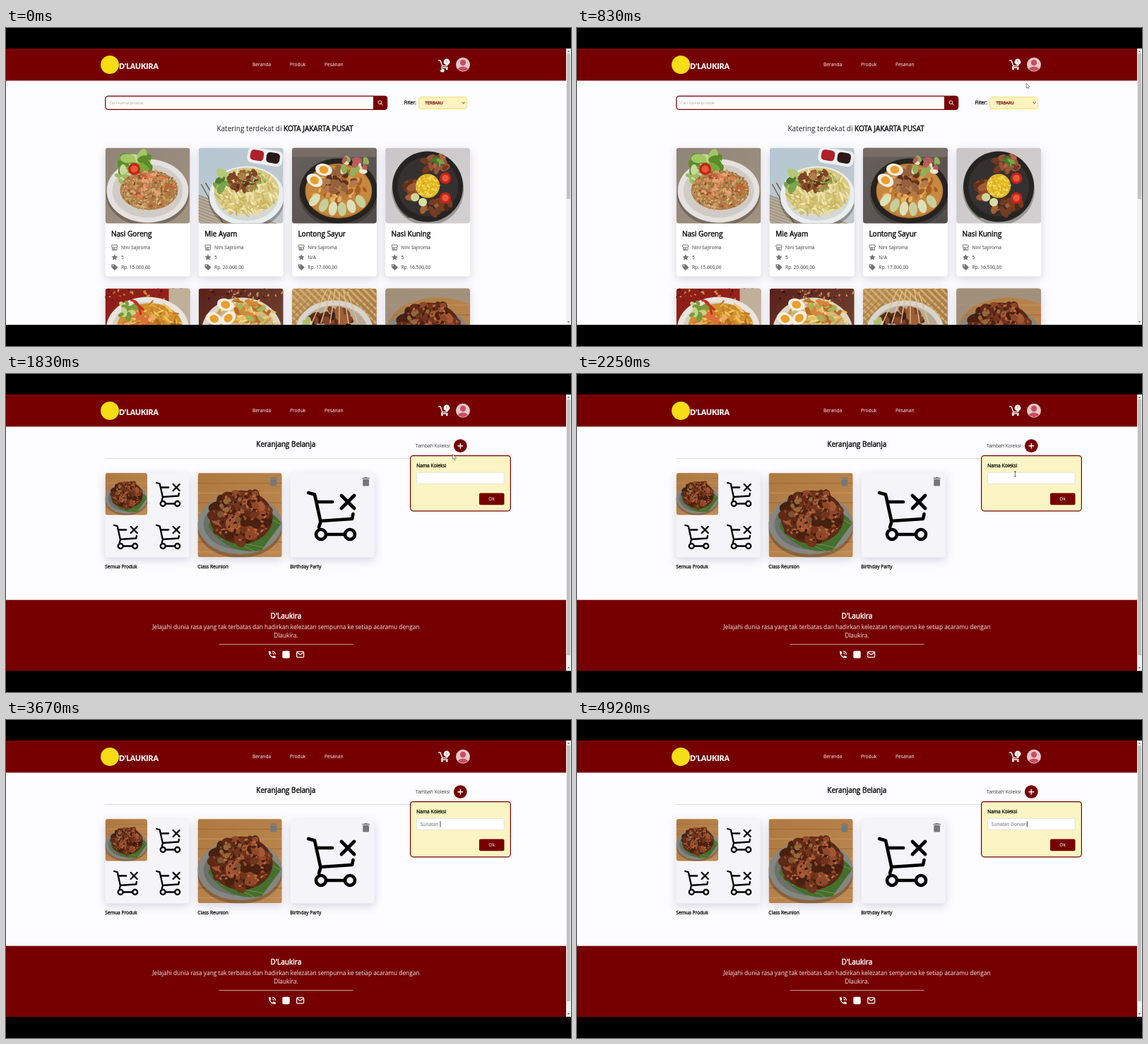
Animation of 800x450 px, one loop 5010 ms. Source, as an HTML page with a canvas:

```html
<!DOCTYPE html>
<html lang="id">
<head>
<meta charset="utf-8">
<title>Katering</title>
<style>
  html, body { margin: 0; width: 100%; height: 100%; overflow: hidden; background: #000; }
  canvas { display: block; width: 800px; height: 450px; }
</style>
</head>
<body>
<canvas id="stage" width="800" height="450"></canvas>
<script>
const LOOP = 5010, STEP = 1000 / 12;
const MAROON = '#760001', PAPER = '#fdfcfe', CREAM = '#fbf4c3', GREY = '#737376';
const BRAND = "D'Laukira", SELLER = 'Nini Sajiroma', ENTRY = 'Sunatan Dorvan';
const screen = document.getElementById('stage').getContext('2d');
let c = screen;

// ---- Basic shapes ----
function rect(x, y, w, h, color) { c.fillStyle = color; c.fillRect(x, y, w, h); }

function box(x, y, w, h, r, fill, border, width = 1) {
  c.beginPath();
  c.roundRect(x, y, w, h, r);
  if (fill) { c.fillStyle = fill; c.fill(); }
  if (border) { c.strokeStyle = border; c.lineWidth = width; c.stroke(); }
}

function oval(x, y, rx, ry, color, turn = 0) {
  c.beginPath();
  c.ellipse(x, y, rx, ry, turn, 0, Math.PI * 2);
  c.fillStyle = color;
  c.fill();
}

const disc = (x, y, r, color) => oval(x, y, r, r, color);

function shape(d, fill, stroke, width = 1) {
  const p = new Path2D(d);
  if (fill) { c.fillStyle = fill; c.fill(p); }
  if (stroke) {
    c.strokeStyle = stroke; c.lineWidth = width;
    c.lineCap = c.lineJoin = 'round';
    c.stroke(p);
  }
}

function at(x, y, scale, draw) {
  c.save();
  c.translate(x, y);
  c.scale(scale, scale);
  draw();
  c.restore();
}

function shadow(draw) {
  c.save();
  c.shadowColor = 'rgba(90,90,140,.24)';
  c.shadowBlur = 13;
  c.shadowOffsetY = 4;
  draw();
  c.restore();
}

function text(str, x, y, size, color, { bold, align = 'left' } = {}) {
  c.font = `${size}px "Open Sans", sans-serif`;
  c.textAlign = align;
  c.textBaseline = 'alphabetic';
  c.fillStyle = c.strokeStyle = color;
  c.fillText(str, x, y);
  if (bold) { c.lineWidth = size * .045; c.lineJoin = 'round'; c.strokeText(str, x, y); }
  return c.measureText(str).width;
}

// ---- Food pictures, drawn in a 120-unit wide space ----
function random(seed) {
  return () => (seed = (seed * 16807) % 2147483647) / 2147483647;
}

function scatter(seed, n, x, y, rx, ry, size, colors, slim = .6) {
  const rnd = random(seed * 7919);
  for (let i = 0; i < n; i++) {
    const a = rnd() * Math.PI * 2, d = Math.sqrt(rnd()), s = size * (.6 + rnd() * .7);
    oval(x + Math.cos(a) * rx * d, y + Math.sin(a) * ry * d, s, s * slim,
      colors[Math.floor(rnd() * colors.length)], rnd() * Math.PI);
  }
}

function backdrop(from, to) {
  const g = c.createLinearGradient(0, 0, 120, 120);
  g.addColorStop(0, from);
  g.addColorStop(1, to);
  rect(0, 0, 120, 120, g);
}

function plate(x, y, rx, ry, rim, inside) {
  oval(x, y + 4, rx + 1, ry + 1, 'rgba(30,20,20,.3)');
  oval(x, y, rx, ry, rim);
  oval(x, y, rx * .86, ry * .84, inside);
}

function egg(x, y, turn) {
  oval(x, y, 12, 8.5, '#f6eee2', turn);
  oval(x, y, 6.5, 5.5, '#e9a02c', turn);
}

function tomato(x, y, r) {
  disc(x, y, r, '#c92318');
  disc(x, y, r * .6, '#e8583a');
}

function friedRice() {
  backdrop('#8f8478', '#a39482');
  plate(60, 61, 58, 45, '#e4e1de', '#d0cbc6');
  scatter(2, 26, 42, 23, 25, 13, 9, ['#79a83a', '#a4c765', '#5d8b2b', '#c5dc94']);
  scatter(3, 7, 23, 39, 7, 10, 7, ['#c8d99a', '#9dbb62']);
  oval(62, 60, 41, 28, '#ad7c48');
  scatter(4, 380, 62, 59, 41, 28, 2.4, ['#c99a62', '#a8713a', '#dcb883', '#8d5b2f', '#bf8b51', '#d6a873'], .45);
  scatter(5, 22, 65, 55, 30, 19, 5, ['#dc8154', '#e7a276', '#c55f35'], .45);
  scatter(6, 20, 62, 60, 36, 23, 1.8, ['#6f8c33', '#b23a20']);
  tomato(41, 30, 8.5);
}

function chickenNoodles() {
  backdrop('#b5c8d4', '#c3c7c8');
  c.save();
  c.translate(-5, 65); c.rotate(.35);
  rect(0, 0, 140, 70, '#b6aa98');
  for (let i = 0; i < 18; i++) rect(0, i * 4, 140, 1, '#988b7c');
  c.restore();
  shape('M4 52L34 106M10 50L42 104', null, '#75604f', 1.5);
  c.save();
  c.translate(94, 13); c.rotate(.16);
  box(-25, -11, 50, 22, 7, '#edf0f2');
  box(-21, -8, 19, 15, 5, '#ae202a');
  box(2, -8, 19, 15, 5, '#2c1819');
  c.restore();
  plate(68, 68, 53, 42, '#e9edef', '#d3d8d6');
  oval(68, 61, 46, 33, '#d8c982');
  scatter(12, 170, 68, 64, 43, 31, 6, ['#ecdf9e', '#d2bc69', '#f1e8b8', '#c7b25e'], .2);
  scatter(13, 20, 33, 48, 10, 13, 6, ['#4f7c2e', '#7ca34b', '#b3c977']);
  scatter(14, 55, 65, 47, 23, 15, 5, ['#7d4527', '#9b6038', '#5d301d', '#b57a4a']);
  scatter(15, 32, 76, 46, 18, 15, 2, ['#78a740', '#9fbe64']);
}

function riceCakeCurry() {
  backdrop('#68615d', '#4e4a48');
  rect(0, 0, 120, 13, '#776d66');
  plate(66, 61, 55, 46, '#26231f', '#b77836');
  oval(66, 61, 46, 36, '#c7893f');
  scatter(21, 65, 70, 60, 38, 27, 5, ['#d79a4b', '#c27830', '#e3b468', '#a75e25']);
  scatter(22, 35, 68, 49, 24, 18, 7, ['#74432a', '#96613d', '#59311e', '#b27b4d']);
  scatter(23, 15, 89, 25, 19, 14, 6, ['#e5dfba', '#f1e8d2', '#ba5c58', '#95ae58']);
  for (let i = 0; i < 6; i++) oval(32 + i * 13, 74 + Math.sin(i * .6) * 13, 6, 10, i % 2 ? '#c6cf9b' : '#dce0b8', .7 - i * .25);
  egg(32, 46, .5);
  egg(45, 31, .2);
}

function yellowRice() {
  backdrop('#c9c6c8', '#d4d1d2');
  shape('M12 61Q50 64 67 101L32 99Q12 84 12 61Z', '#466b32');
  shape('M16 66L57 97M18 76L45 99', null, '#6b8b44', .8);
  plate(60, 55, 50, 50, '#262423', '#343130');
  scatter(31, 26, 70, 23, 17, 12, 6, ['#703a22', '#975438', '#bb633f']);
  scatter(32, 22, 38, 55, 12, 17, 7, ['#63301d', '#8b4627', '#a25d36']);
  scatter(33, 22, 72, 83, 22, 11, 6, ['#743c22', '#a26037', '#4e2a1a']);
  disc(60, 54, 17, '#e1b824');
  scatter(34, 100, 60, 54, 16, 16, 2, ['#f2d343', '#d9a91b', '#f5df6d'], .5);
  disc(42, 70, 6, '#cfd697'); disc(53, 77, 6, '#d8dfa5');
  tomato(85, 43, 8); tomato(85, 71, 8);
  scatter(35, 8, 73, 17, 8, 8, 5, ['#487531', '#79a346'], .4);
}

function friedNoodles() {
  backdrop('#8b1c18', '#a62a1e');
  scatter(41, 45, 60, 8, 65, 14, 2, ['#c2913d', '#5d120f']);
  rect(90, 0, 30, 70, '#c0b09a');
  plate(60, 58, 59, 46, '#e8e4de', '#d9cdbd');
  oval(63, 54, 46, 33, '#cf902e');
  scatter(42, 150, 63, 52, 44, 32, 6, ['#e5b146', '#c77c26', '#efc869', '#ad6224'], .24);
  scatter(43, 14, 49, 48, 24, 14, 6, ['#da713a', '#efaa6a']);
  scatter(44, 11, 32, 29, 14, 12, 6, ['#799a3a', '#c4d48a']);
  shape('M37 17Q48 17 50 36M41 19L54 30', null, '#ca2d1c', 3);
}

function eggNoodles() {
  backdrop('#5a211c', '#764c35');
  scatter(51, 45, 65, 8, 64, 14, 2, ['#9e3b2d', '#ba8b55', '#341511']);
  plate(61, 62, 57, 49, '#dcd7cc', '#c6b58c');
  scatter(52, 130, 66, 50, 43, 36, 7, ['#d59736', '#e7bd5e', '#b97427', '#efd58a'], .22);
  scatter(53, 25, 76, 32, 25, 14, 5, ['#bc682b', '#d48739', '#a5b45c']);
  egg(22, 43, .4); egg(42, 42, -.7); egg(38, 23, .3);
}

function satay() {
  backdrop('#be9459', '#9b6e3c');
  for (let i = -8; i < 15; i++) {
    shape(`M${i * 10} 0l70 70`, null, '#d0aa70', 3);
    shape(`M${i * 10 + 40} 0l-70 70`, null, '#a67b45', 1.2);
  }
  plate(60, 61, 55, 44, '#d7d4ce', '#b9aa95');
  scatter(61, 60, 60, 58, 40, 29, 8, ['#592b19', '#81452a', '#9d6036', '#3f2016']);
  for (let i = 0; i < 6; i++) shape(`M${49 + i * 6} ${2 + i % 2 * 3}L${28 + i * 13} 49`, null, '#dfc18c', 1.4);
  scatter(62, 14, 22, 56, 9, 12, 5, ['#aebc69', '#d6d8a0']);
}

function beefStew() {
  backdrop('#ae7941', '#bd8952');
  for (let i = 0; i < 9; i++) rect(0, i * 14, 120, 1, i % 2 ? '#9d6835' : '#c69760');
  plate(60, 73, 60, 43, '#858681', '#6b706a');
  shape('M15 77Q22 43 62 41Q108 51 119 72L91 110Q45 119 15 77Z', '#456f2d');
  shape('M22 84L80 111M33 94L94 106M94 60L118 73', null, '#749348', 1);
  oval(62, 63, 45, 38, '#592716');
  scatter(71, 90, 62, 62, 41, 34, 9, ['#71341c', '#8f472a', '#5e2a18', '#a35834', '#48200f'], .72);
  scatter(72, 110, 62, 62, 42, 35, 2.2, ['#b76a3d', '#9a4c2a', '#3f1a0d'], .6);
  scatter(73, 7, 54, 54, 24, 20, 4, ['#7c5530', '#92683b'], .9);
}

function stoneStew() {
  c.save();
  c.translate(0, -5);
  beefStew();
  c.restore();
  shape('M0 0H120V22Q75 6 44 18Q12 24 0 58Z', 'rgba(155,151,144,.72)');
}

function photo(x, y, w, h, r, dish) {
  c.save();
  c.beginPath();
  c.roundRect(x, y, w, h, r);
  c.clip();
  c.translate(x, y);
  c.scale(w / 120, w / 120);
  dish();
  c.restore();
}

// ---- Page parts ----
function trolley(x, y) {
  at(x, y, 1, () => {
    shape('M.5 1H3L5.8 8.6H12.2L14.6 3.4M5.8 8.6L4.4 11H13.2', null, '#fff', 1.4);
    disc(5.4, 13, 1.4, '#fff');
    disc(12.2, 13, 1.4, '#fff');
  });
  disc(x + 12, y + 3, 4.4, '#fff');
}

function header() {
  rect(0, 29, 793, 45.5, MAROON);
  disc(147, 52, 13, '#f7dd16');
  c.font = '900 10.5px Lato, sans-serif';
  c.textAlign = 'left';
  c.fillStyle = '#fff';
  c.fillText(BRAND.toUpperCase(), 160, 58);
  ['Beranda', 'Produk', 'Pesanan'].forEach((s, i) => text(s, [349, 402, 451][i], 53.8, 6.67, '#fff'));
  trolley(612, 45);
  disc(647, 51.7, 10, '#e3c8ca');
  c.save();
  c.beginPath(); c.arc(647, 51.7, 9.2, 0, 7); c.clip();
  disc(647, 49, 4.2, '#c94d60');
  oval(647, 60, 7.5, 5.5, '#c94d60');
  c.restore();
}

function scrollbar(end) {
  rect(793, 29, 7, 391, '#f1f1f1');
  rect(794, 36, 5, end - 36, '#c1c1c1');
  shape('M794.8 34L796.5 32L798.2 34Z', '#666');
  shape('M794.8 415L796.5 417L798.2 415Z', '#666');
}

function rowIcons(x, y) {
  at(x, y, 1, () => {
    shape('M-3.5 -3.5H3.5L4 -.5Q2.7 1 1.3 -.3Q0 1 -1.3 -.3Q-2.7 1 -4 -.5ZM-3.2 .5V3.7H3.2V.5M-1.7 3.5V1.5H.4V3.5', null, GREY, 1);
    shape('M0 9.6L1.3 12.5L4.4 12.8L2.1 14.9L2.8 18L0 16.4L-2.8 18L-2.1 14.9L-4.4 12.8L-1.3 12.5Z', GREY);
    shape('M-4 24.2H0L4.3 28.2L.2 32.3L-4 28.2Z', GREY, GREY, .6);
    disc(-2.3, 25.9, .8, '#fff');
  });
}

function productCard(x, dish, name, stars, price) {
  shadow(() => box(x, 169.5, 120, 182, 4, '#fff'));
  photo(x, 169.5, 120, 107, 4, dish);
  text(name, x + 8.5, 295, 10, '#111', { bold: true });
  rowIcons(x + 13.3, 310.5);
  [SELLER, stars, `Rp. ${price},00`].forEach((s, i) => text(s, x + 22.4, 312.9 + i * 14, 6.67, '#333'));
}

function homePage() {
  rect(0, 29, 800, 391, PAPER);
  header();
  box(140.8, 96.4, 398.8, 18.9, 4, '#fff', MAROON, 1.3);
  box(520, 96, 20, 19.7, [0, 4, 4, 0], MAROON);
  text('Cari nama produk', 146.3, 108, 5.83, '#a4a4a8');
  c.beginPath(); c.arc(529.4, 105.2, 2.4, 0, 7);
  c.strokeStyle = '#fff'; c.lineWidth = .9; c.stroke();
  shape('M531.2 107L533.2 109', null, '#fff', .9);
  text('Filter:', 563.4, 108.3, 6.67, '#111', { bold: true });
  box(584.6, 97.7, 68, 16.7, 4, '#fcf3bd', '#f3e48f', 1.2);
  text('TERBARU', 593.6, 108.2, 5.83, MAROON, { bold: true });
  shape('M646.1 105.3L647.7 106.8L649.3 105.3', null, '#333', 1);
  const w = text('Katering terdekat di ', 298.4, 146.2, 10, '#222');
  text('KOTA JAKARTA PUSAT', 298.4 + w, 146.2, 10, '#111', { bold: true });
  const columns = [140.5, 272.7, 404.9, 537.1];
  productCard(columns[0], friedRice, 'Nasi Goreng', '5', '15.000');
  productCard(columns[1], chickenNoodles, 'Mie Ayam', '5', '20.000');
  productCard(columns[2], riceCakeCurry, 'Lontong Sayur', 'N/A', '17.000');
  productCard(columns[3], yellowRice, 'Nasi Kuning', '5', '16.500');
  [friedNoodles, eggNoodles, satay, stoneStew].forEach((dish, i) => {
    shadow(() => box(columns[i], 368.5, 120, 100, 4, '#fff'));
    photo(columns[i], 368.5, 120, 107, 4, dish);
  });
  scrollbar(242);
}

function emptyCart(x, y, scale) {
  at(x, y, scale, () => {
    shape('M-32 -32L-23 -29.5L-14.5 9L-17 17M-20 -19H2M-15 8L30 5L31.5 -2', null, '#000', 4.6);
    shape('M15 -28L33 -10M33 -28L15 -10', null, '#000', 4.8);
    shape('M-6 27H20', null, '#000', 4.6);
    for (const wheel of [-14, 27]) {
      c.beginPath(); c.arc(wheel, 27, 7, 0, 7);
      c.stroke();
    }
  });
}

function trash(x, y) {
  rect(x - 5.2, y - 5.5, 10.4, 1.5, '#77777a');
  rect(x - 2, y - 6.3, 4, 1.2, '#77777a');
  box(x - 4.4, y - 3.3, 8.8, 9.4, 1, '#77777a');
}

function footer() {
  rect(0, 319.7, 793, 100.3, MAROON);
  const center = { align: 'center' };
  text(BRAND, 396.4, 345.8, 10, '#fff', { bold: true, align: 'center' });
  text('Jelajahi dunia rasa yang tak terbatas dan hadirkan kelezatan sempurna ke setiap acaramu dengan', 396.4, 360.6, 8.33, '#f4e9e9', center);
  text('Dlaukira.', 396.4, 372.8, 8.33, '#f4e9e9', center);
  rect(301.5, 382, 190, .8, '#d9bcbc');
  at(376.7, 397, 1, () => {
    shape('M-4.8 -4.8H-2.2L-1.3 -1.6L-2.8 -.4Q-1.5 2 .8 3L2 1.5L5 2.4V5H3.5Q-4.5 4.4 -4.8 -4.8Z', '#fff');
    shape('M.6 -4.6Q4.3 -4.3 4.7 -.5M.8 -2.2Q2.4 -2 2.5 -.5', null, '#fff', 1.1);
  });
  box(391.3, 391.8, 10.4, 10.4, 2, '#fff');
  box(411.6, 392.8, 10, 8, 1, null, '#fff', 1.2);
  shape('M412 394L416.6 397.2L421.2 394', null, '#fff', 1.2);
}

function cartPage() {
  rect(0, 29, 800, 391, PAPER);
  header();
  text('Keranjang Belanja', 396.3, 103, 10, '#111', { bold: true, align: 'center' });
  text('Tambah Koleksi', 580, 104, 6.67, '#333');
  disc(643.3, 101.7, 9.4, MAROON);
  shape('M640 101.7H646.6M643.3 98.4V105', null, '#fff', 1.4);
  rect(140.5, 119.2, 512.5, .8, '#d6d5d8');
  for (const x of [140.5, 271.5, 402.5]) shadow(() => box(x, 140, 119.2, 119.5, 4, '#f5f4f8'));
  photo(140.5, 140, 59.6, 59.7, 4, beefStew);
  photo(271.5, 140, 119.2, 119.5, 4, beefStew);
  for (const [x, y] of [[229.2, 170], [169.2, 230], [229.2, 230]]) emptyCart(x, y, .5);
  emptyCart(460, 200, 1);
  trash(378.7, 152.3);
  trash(509.6, 152.3);
  ['Semua Produk', 'Class Reunion', 'Birthday Party'].forEach((s, i) =>
    text(s, 140.3 + i * 131, 275.4, 6.67, '#111', { bold: true }));
  footer();
  scrollbar(398);
}

function dialog(entry, caret) {
  box(572.6, 115.6, 141.8, 78.2, 4, CREAM, MAROON, 1.2);
  text('Nama Koleksi', 581.2, 131.8, 6.67, '#111', { bold: true });
  box(581.4, 139.3, 123.8, 16, 2, '#fff', '#dedde0', .8);
  const w = text(entry, 586.7, 149.8, 6.67, '#666');
  if (caret) rect(587.2 + w, 143.2, .8, 8.4, '#222');
  box(670, 168.5, 35.5, 16.7, 2, MAROON);
  text('Ok', 687.7, 179.2, 6.67, '#fff', { align: 'center' });
}

// ---- Pointer ----
const track = [
  [0, 617, 54], [417, 617, 54], [750, 632.5, 76], [1000, 643, 83], [1167, 649.3, 84],
  [1583, 643, 101], [1750, 643, 101], [1833, 632.5, 114], [2333, 618, 147]
];

function pointerAt(t) {
  const i = track.findIndex(k => k[0] > t);
  if (i < 0) return track[track.length - 1].slice(1);
  const [t0, x0, y0] = track[i - 1], [t1, x1, y1] = track[i];
  const p = (t - t0) / (t1 - t0);
  return [x0 + (x1 - x0) * p, y0 + (y1 - y0) * p];
}

function pointer(t) {
  const [x, y] = pointerAt(Math.floor((t + 4) / STEP) * STEP);
  const onLink = t < 500 || (t >= 1410 && t < 1830);
  at(x, y, 1, () => {
    if (onLink) {
      shape('M-.9 .2Q0 -1 .9 .2V3.2L3.6 3.9Q4.4 4.5 3.9 6.2L3.2 8.7H-1L-3 5.4Q-2.6 4.3 -.9 5.4Z', '#fff', '#222', .6);
    } else if (t >= 2160) {
      shape('M-1.2 -3.5H1.2M0 -3.5V3.5M-1.2 3.5H1.2', null, '#333', .7);
    } else {
      shape('M0 0V6.8L1.6 5.3L2.6 7.6L3.7 7.1L2.7 4.9H4.8Z', '#fff', '#444', .6);
    }
  });
}

// ---- Timeline ----
const keyTimes = [[2830, 1], [3000, 2], [3170, 4], [3330, 6], [3500, 7], [3670, 8],
  [3920, 9], [4080, 10], [4170, 11], [4250, 12], [4330, 13], [4420, 14]];

function cached(draw) {
  const layer = document.createElement('canvas');
  layer.width = 800;
  layer.height = 450;
  c = layer.getContext('2d');
  c.fillRect(0, 0, 800, 450);
  c.beginPath(); c.rect(0, 29, 800, 391); c.clip();
  draw();
  c = screen;
  return layer;
}

const home = cached(homePage), cart = cached(cartPage);

function render(t) {
  c.drawImage(t < 920 ? home : cart, 0, 0);
  if (t < 920 || t >= 1250) text('1', 624, 50.2, 5.8, MAROON, { align: 'center' });
  if (t >= 1830) {
    const typed = keyTimes.filter(k => t >= k[0]).pop();
    dialog(ENTRY.slice(0, typed ? typed[1] : 0), t >= 2330);
  }
  if (t < 2830) pointer(t);
}

const start = performance.now();
function tick() {
  render((performance.now() - start) % LOOP);
  requestAnimationFrame(tick);
}
tick();
</script>
</body>
</html>
```
